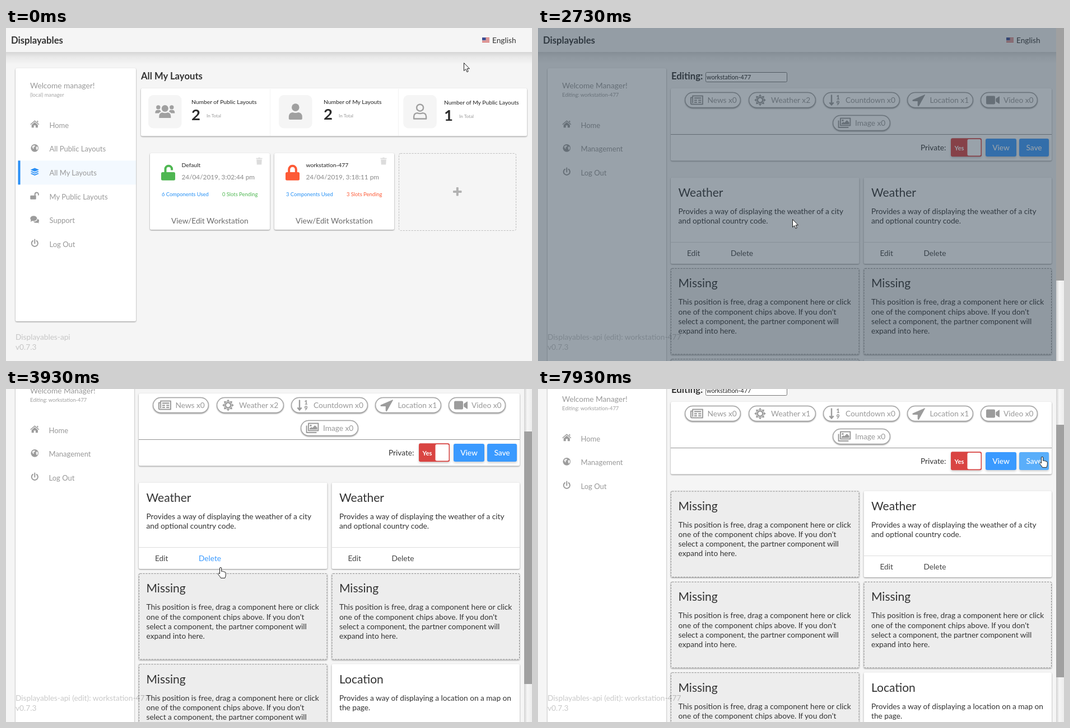
Recreate the animation shown at these times as an HTML page. Size 939 by 596 pixels, loop 8 s.

```html
<!DOCTYPE html>
<html lang="en">
<head>
<meta charset="utf-8">
<title>Displayables</title>
<style>
  html, body { margin: 0; width: 100%; height: 100%; overflow: hidden; background: #f5f5f5; }
  svg { display: block; width: 100vw; height: 100vh; font-family: Lato, sans-serif; }
  text { white-space: pre; }
  .panel { filter: drop-shadow(0 1px 1px rgba(0, 0, 0, .42)); }
  .button { filter: drop-shadow(0 2px 2px rgba(0, 0, 0, .2)); }
</style>
</head>
<body>
<svg id="stage" viewBox="0 0 939 596"></svg>
<script>
const BLUE = '#3a9aff', GREY = '#999', INK = '#333', ICON = '#9c9c9c';
const BODY = 13.7, NAV = 13, HEADING = 16.7;
const FPS = 15, LOOP = 8000, NOTCH = 85.5;

// Markup helpers; text is placed by the middle of its capitals.
const text = (x, y, s, size = BODY, fill = INK, extra = '') =>
  `<text x="${x}" y="${y + size * .355}" font-size="${size}" fill="${fill}" ${extra}>${s}</text>`;
const rect = (x, y, w, h, fill, extra = '') =>
  `<rect x="${x}" y="${y}" width="${w}" height="${h}" fill="${fill}" ${extra}/>`;
const panel = (x, y, w, h) => rect(x, y, w, h, '#fff', 'rx="2.5" class="panel"');
const line = (x1, y1, x2, y2, stroke) =>
  `<path d="M${x1} ${y1}L${x2} ${y2}" stroke="${stroke}"/>`;
const fillPath = (d, extra = '') => `<path d="${d}" ${extra}/>`;
const strokePath = (d, w, extra = '') =>
  `<path d="${d}" fill="none" stroke="currentColor" stroke-width="${w}" ${extra}/>`;
const disc = (x, y, r) => `<circle cx="${x}" cy="${y}" r="${r}"/>`;
const bold = 'font-weight="700"';

const icons = {
  home: fillPath('M-8 0L0-7 8 0 7 1.1 0-5-7 1.1ZM-5.6 1.2L0-3.6 5.6 1.2V6H1.6V2H-1.6V6H-5.6ZM4-6.2H6V-2.6L4-4.4Z'),
  globe: disc(0, 0, 6.9) + fillPath('M-5-2.5L-2-4.8 1-4.6 0-2.4-2-1.2-1.4 1-3 1.4ZM2.2-2.4L5.4-2.6 6 1 4 4 2.4 1.6Z', 'fill="#fff" opacity=".85"'),
  layers: fillPath('M0-7L7.6-3.7 0-.4-7.6-3.7ZM-7.6-.2L-5.4-1.2 0 1.2 5.4-1.2 7.6-.2 0 3.1ZM-7.6 3.2L-5.4 2.2 0 4.6 5.4 2.2 7.6 3.2 0 6.6Z'),
  unlock: rect(-8, -.5, 10.4, 7, 'currentColor', 'rx="1.2"') + strokePath('M.4 0V-2.6a3 3 0 0 1 6.2 0V-.6', 2),
  chat: `<ellipse cx="-2" cy="-2" rx="6" ry="4.6"/>` + fillPath('M-7.6 4L-6.4 0-3 2ZM4.8-1.4Q8 .2 7.8 2.6 7.6 4 6.6 4.8L8 6.8 4.6 5.8Q-.4 6.8-2.4 3.8 4.6 3.4 4.8-1.4Z'),
  power: strokePath('M-3.4-4.6a5.6 5.6 0 1 0 6.8 0M0-7V0', 2, 'stroke-linecap="round"'),
  trash: fillPath('M-5.5-5.2H-2L-1.3-6.2H1.3L2-5.2H5.5V-3.4H-5.5ZM-4.8-2.6H4.8L4.2 6.4H-4.2Z'),
  user: disc(0, -7.4, 6.8) + fillPath('M-12 13V9Q-11.6 2-5 1.4 0 3.6 5 1.4 11.6 2 12 9V13Q12 14.4 10 14.4H-10Q-12 14.4-12 13Z'),
  outline: strokePath('M-6-6.8a6 6 0 1 0 12 0a6 6 0 1 0-12 0ZM-11 13V9Q-10.6 3-5 2.6 0 4.6 5 2.6 10.6 3 11 9V13Z', 2.4, 'stroke-linejoin="round"'),
  group: disc(0, -5.6, 6) + disc(-12, -7.6, 3.7) + disc(12, -7.6, 3.7) +
    fillPath('M-10.5 11.5V8Q-10 2.4-4.6 1.8 0 3.6 4.6 1.8 10 2.4 10.5 8V11.5ZM-17.5 2Q-17.5-2.8-13-2.8H-9L-7 .2Q-9.6 1-11 3H-17.5ZM17.5 2Q17.5-2.8 13-2.8H9L7 .2Q9.6 1 11 3H17.5Z'),
  news: strokePath('M-7.4-7.4H10.4V7.4H-9Q-10.6 7.4-10.6 5.8V-4.6H-7.4ZM-7.4-5V5.6', 2, 'stroke-linejoin="round"') +
    strokePath('M-4.6-3.6H7.8M-4.6.4H.4M2.6.4H7.8M-4.6 4H.4M2.6 4H7.8', 2.2),
  sun: strokePath('M-4.8 0a4.8 4.8 0 1 0 9.6 0a4.8 4.8 0 1 0-9.6 0', 2.6) +
    [...Array(8)].map((_, i) => `<path d="M-3-6.4L0-10.4 3-6.4Z" transform="rotate(${i * 45})"/>`).join(''),
  count: strokePath('M-5-9.5V7M-8.6 4.4L-5 8.4-1.4 4.4', 2.4) +
    text(3.4, -5, '1', 10.5, 'currentColor', 'font-weight="900"') + text(3.4, 5.2, '9', 10.5, 'currentColor', 'font-weight="900"'),
  place: fillPath('M11.4-10L-10.6-.4Q-12 1.8-9.6 2H-1.8V9.6Q-1.4 12 .6 10.4L11.4-9Z'),
  video: rect(-12, -7.5, 16, 15, 'currentColor', 'rx="2"') + fillPath('M5.2-2.6L11-6.6Q12-6.8 12-5.6V5.6Q12 6.8 11 6.6L5.2 2.6Z'),
  image: strokePath('M-7-8.4H10.4V4.4H-7ZM-10.4-4.6V8H7.4', 2, 'stroke-linejoin="round"') +
    disc(-3, -4.6, 1.7) + fillPath('M-5 2.6V.6L-2-2 0-.4 4.4-5 8.6-1V2.6Z')
};
const icon = (name, x, y, color = ICON) =>
  `<g transform="translate(${x} ${y})" fill="${color}" color="${color}">${icons[name]}</g>`;

const header = (width, flagX) =>
  rect(0, 43, width, 22, 'url(#shade)') + rect(0, 0, width, 43, '#f5f5f5') +
  text(9, 22, 'Displayables', HEADING, INK, bold) +
  rect(flagX, 17, 13, 9, '#e9dede') +
  [0, 2, 4, 6, 8].map(i => rect(flagX, 17 + i, 13, 1, '#d0504f')).join('') +
  rect(flagX, 17, 6.5, 5, '#3c4c92') +
  text(flagX + 18, 22, 'English');

const nav = (items, x, active) => items.map(([name, label], i) => {
  const y = 174 + i * 42.65;
  const mark = i === active
    ? rect(21.5, y - 22, 210.5, 43, '#f3f9ff') + rect(21.5, y - 22, 4, 43, '#2a8ff5') : '';
  return mark + icon(name, 51.3, y - 1.8, i === active ? '#2a8ff5' : ICON) + text(x, y, label, NAV, GREY);
}).join('');

const stat = (boxX, x, y, name, label, n) =>
  rect(boxX, 120, 59.5, 59.5, '#f5f5f5', 'rx="9"') + icon(name, boxX + 29.8, 149.5, '#a0a0a0') +
  text(x, y, label, 10.3, '#222') + text(x, y + 22.5, n, 27.5, '#2b2b2b', bold) +
  text(x + 27, y + 24.8, 'In Total', 8.2, GREY);

function layoutCard(x, title, date, used, pending, color, open) {
  const cx = x + 32.5;
  const shackle = open ? `M${cx - 5} 260V252.5a5.8 5.8 0 0 1 11.6 0V254.5` : `M${cx - 6.3} 260V253a6.3 6.3 0 0 1 12.6 0V260`;
  return panel(x, 224, 214, 137) + icon('trash', x + 195, 238, '#dcdcdc') +
    rect(x + 20, 258, 25, 14.8, color, 'rx="2.5"') + `<g color="${color}">${strokePath(shackle, 4)}</g>` +
    text(x + 56.5, 245.5, title, 10.3, '#222') + text(x + 56.5, 267.3, date, 11.8, '#8a8a8a') +
    text(x + 21, 298, used + ' Components Used', 9.4, '#2590f5') +
    text(x + 129, 298, pending + ' Slots Pending', 9.4, color);
}

const viewLabel = (x, id) => text(x, 345, 'View/Edit Workstation', BODY, '#6b6b6b', `text-anchor="middle" id="${id}"`);

const listPage = header(939, 850) +
  panel(17, 72, 215, 453) +
  text(43, 103, 'Welcome manager!', BODY, GREY) + text(43, 120, '(local) manager', 9.2, '#a5a5a5') +
  nav([['home', 'Home'], ['globe', 'All Public Layouts'], ['layers', 'All My Layouts'],
    ['unlock', 'My Public Layouts'], ['chat', 'Support'], ['power', 'Log Out']], 77.5, 2) +
  text(241, 86.5, 'All My Layouts', HEADING, INK, bold) +
  panel(241, 108, 689, 85.5) + line(471.5, 109, 471.5, 193, '#f3f3f3') + line(700.5, 109, 700.5, 193, '#f3f3f3') +
  stat(254, 331, 132.7, 'group', 'Number of Public Layouts', 2) +
  stat(487, 567, 132, 'user', 'Number of My Layouts', 2) +
  stat(709.3, 782, 133.4, 'outline', 'Number of My Public Layouts', 1) +
  layoutCard(257, 'Default', '24/04/2019, 3:02:44 pm', 6, 0, '#4fb752', true) +
  layoutCard(479, 'workstation-477', '24/04/2019, 3:18:11 pm', 3, 3, '#fd5a36', false) +
  rect(479, 329, 214, 32, BLUE, 'id="viewTint" opacity="0"') +
  viewLabel(363.8, 'view0') + viewLabel(585.8, 'view1') +
  rect(701.5, 224.5, 209, 138, 'none', 'rx="3" stroke="#bdbdbd" stroke-dasharray="3 2"') +
  rect(798, 291, 15.5, 4, '#b2b2b2', 'rx="1"') + rect(803.8, 285, 4, 15.5, '#b2b2b2', 'rx="1"') +
  text(17, 553.5, 'Displayables-api', BODY, '#c6c6c6') + text(17, 571, 'v0.7.3', BODY, '#c6c6c6');

const chip = (x, y, w, name, iconX, label, textX, id = '') =>
  rect(x + .7, y - 13.5, w - 1.4, 27, '#fff', `rx="13.5" stroke="#a2a2a2" stroke-width="1.3" class="panel"`) +
  icon(name, iconX, y) + text(textX, y, label, BODY, GREY, id && `id="${id}"`);

const button = (x, w, label, id) =>
  rect(x, 198, w, 32, BLUE, `rx="3" class="button" id="${id}"`) +
  text(x + w / 2, 214.5, label, BODY, '#fff', 'font-weight="500" text-anchor="middle"');

const about = {
  Weather: ['Provides a way of displaying the weather of a city', 'and optional country code.'],
  Location: ['Provides a way of displaying a location on a map on', 'the page.'],
  Missing: ['This position is free, drag a component here or click', "one of the component chips above. If you don't",
    'select a component, the partner component will', 'expand into here.']
};

function slot(col, row, kind, id = '') {
  const x = col ? 581.5 : 237, y = 267.6 + row * 162.3, w = col ? 335.5 : 336.5, free = kind === 'Missing';
  const box = free
    ? rect(x, y, w, 154.5, '#ededed', 'rx="2" class="panel"') +
      rect(x + .5, y + .5, w - 1, 153.5, 'none', 'rx="2" stroke="#8f8f8f" stroke-dasharray="3 2"')
    : panel(x, y, w, 154.5) + line(x, y + 116, x + w, y + 116, '#dcdcdc') +
      text(x + 29, y + 135.6, 'Edit', BODY, '#444') +
      text(x + 107, y + 135.6, 'Delete', BODY, '#444', id && `id="delete"`);
  return `<g id="${id}">` + box + text(x + 13.5, y + 27, kind, 21) +
    about[kind].map((s, i) => text(x + 13.5, y + 60.7 + i * 17.1, s)).join('') + '</g>';
}

const editPage = header(925, 836) +
  panel(17, 72, 212, 667) +
  text(43, 103, 'Welcome Manager!', BODY, GREY) + text(43, 120, 'Editing: workstation-477', 9.3, '#a0a0a0') +
  nav([['home', 'Home'], ['globe', 'Management'], ['power', 'Log Out']], 76.5, -1) +
  text(238, 86.5, 'Editing:', HEADING, INK, bold) +
  rect(299.5, 79.5, 145, 17, '#fff', 'rx="2" stroke="#777"') + text(301, 88.3, 'workstation-477', 10.8, '#222') +
  panel(237, 108, 680, 129.5) + line(237, 190.5, 917, 190.5, '#929292') +
  chip(262, 129, 100, 'news', 283.5, 'News x0', 302.5) +
  chip(376, 129, 120, 'sun', 396.5, 'Weather x2', 416, 'weather') +
  chip(509, 129, 137, 'count', 529, 'Countdown x0', 549) +
  chip(659, 129, 118, 'place', 679.5, 'Location x1', 699.5) +
  chip(790, 129, 102, 'video', 812, 'Video x0', 831) +
  chip(526, 170, 103, 'image', 547, 'Image x0', 566) +
  text(683, 214.5, 'Private:') +
  rect(737, 197.3, 55, 33, '#d94442', 'rx="3" class="button"') + rect(766.5, 199, 24, 29.6, '#fff', 'rx="2.5"') +
  text(743.5, 214.5, 'Yes', 11.3, '#fff', bold) +
  button(799, 55, 'View', 'view') + button(859, 53, 'Save', 'save') +
  slot(0, 0, 'Weather', 'filled') + slot(0, 0, 'Missing', 'emptied') + slot(1, 0, 'Weather') +
  slot(0, 1, 'Missing') + slot(1, 1, 'Missing') + slot(0, 2, 'Missing') + slot(1, 2, 'Location');

const cube = id => rect(-6.5, -6.5, 13, 13, '#f5f5f5', `id="${id}"`);

document.getElementById('stage').innerHTML = `
  <defs>
    <linearGradient id="shade" x2="0" y2="1">
      <stop stop-color="#000" stop-opacity=".13"/><stop offset=".4" stop-color="#000" stop-opacity=".05"/>
      <stop offset="1" stop-color="#000" stop-opacity="0"/>
    </linearGradient>
    <linearGradient id="track">
      <stop stop-color="#d2d2d2"/><stop offset=".4" stop-color="#f6f6f6"/><stop offset="1" stop-color="#ececec"/>
    </linearGradient>
  </defs>
  ${rect(0, 0, 939, 596, '#f5f5f5')}
  <g id="list">${listPage}</g>
  <g id="edit">
    <g id="scroller">${editPage}</g>
    ${text(17, 553.5, 'Displayables-api (edit): workstation-477', BODY, '#000', 'opacity=".21"')}
    ${text(17, 571, 'v0.7.3', BODY, '#000', 'opacity=".21"')}
    <g id="loader">${rect(0, 0, 925, 596, '#2c3e50')}<g id="cubes">${cube('cubeA')}${cube('cubeB')}</g></g>
    ${rect(925, 0, 14, 596, 'url(#track)')}${rect(925, 0, 14, 452, '#a0a0a0', 'id="thumb"')}
  </g>
  <g id="cursor" fill="#fff" stroke="#1c1c1c" stroke-linejoin="round">
    <path id="arrow" d="M.5 .5V14.6L3.7 11.6 6 16.8 8.2 15.8 6 10.8H10.4Z"/>
    <path id="hand" d="M-1.5 12V2a1.6 1.6 0 0 1 3.2 0V7.4Q3.4 6.4 4.4 7.8 6 7.2 7 8.6 9.2 8.4 9.3 10.4V13.5Q9.3 16 7.8 19.4H.5Q-1 16.5-4 13.2-5.2 10.9-3.4 10.4-2.3 10.6-1.5 12Z"/>
  </g>`;

const ui = {};
document.querySelectorAll('svg [id]').forEach(el => { if (el.id) ui[el.id] = el; });

const clamp = v => Math.min(1, Math.max(0, v));
const smooth = v => { v = clamp(v); return v * v * (3 - 2 * v); };
const show = (el, on) => el.setAttribute('display', on ? 'inline' : 'none');
const inside = (x, y, x0, y0, x1, y1) => x >= x0 && x <= x1 && y >= y0 && y <= y1;

// Pointer stops: time, x, y
const stops = [[0, 817, 62], [467, 817, 62], [1333, 556, 345], [2333, 556, 345], [2933, 419, 341], [3200, 383, 320],
  [3867, 383, 320], [4733, 360, 237], [4867, 360, 232], [5467, 360, 232], [5533, 360, 233], [6467, 360, 233],
  [6533, 362, 233], [7133, 362, 233], [7933, 900, 121], [8000, 900, 121]];

function pointer(t) {
  const i = Math.max(1, stops.findIndex(s => s[0] >= t));
  const [t0, x0, y0] = stops[i - 1], [t1, x1, y1] = stops[i];
  const e = smooth((t - t0) / (t1 - t0));
  return [x0 + (x1 - x0) * e, y0 + (y1 - y0) * e];
}

function placeCube(el, phase) {
  const p = (phase % 1) * 4, side = Math.floor(p), e = smooth(p - side);
  const x = [e, 1, 1 - e, 0][side], y = [0, e, 1, 1 - e][side];
  const scale = side % 2 ? .5 + e / 2 : 1 - e / 2;
  el.setAttribute('transform', `translate(${452 + 36 * x} ${287 + 36 * y}) rotate(${-90 * (side + e)}) scale(${scale})`);
}

function draw(ms) {
  const t = Math.floor((ms + 5) * FPS / 1000) * 1000 / FPS + .5;
  const editing = t > 2066, loading = editing && t < 2400, removed = t > 5733;
  const tick = start => smooth((t - start) / 260);
  const scroll = Math.floor(NOTCH * (tick(3331) + tick(3865) - tick(6731)));
  const [x, y] = pointer(t);

  const onView = !editing && inside(x, y, 479, 329, 693, 361);
  const onDelete = t > 3200 && t < 5800 && inside(x, y + scroll, 328, 385, 402, 421);
  const onSave = editing && inside(x, y + scroll, 859, 198, 912, 230);

  show(ui.list, !editing);
  show(ui.edit, editing);
  ui.viewTint.setAttribute('opacity', onView ? .08 * clamp((t - 1333) / 533) : 0);
  ui.view1.setAttribute('fill', onView ? BLUE : '#6b6b6b');

  ui.scroller.setAttribute('transform', `translate(0 ${-scroll})`);
  ui.thumb.setAttribute('y', Math.round(scroll * .755));
  ui.thumb.setAttribute('height', t < 2133 ? 311.5 : 452);
  show(ui.filled, !removed);
  show(ui.emptied, removed);
  ui.weather.textContent = removed ? 'Weather x1' : 'Weather x2';
  ui.delete.setAttribute('fill', onDelete ? BLUE : '#444');
  ui.save.setAttribute('fill', onSave ? '#5aaefa' : BLUE);

  ui.loader.setAttribute('opacity', clamp(1 - (t - 2333) / 773));
  show(ui.cubes, loading);
  const spin = Math.max(0, Math.min(t, 2200) - 2016) / 1800;
  placeCube(ui.cubeA, spin);
  placeCube(ui.cubeB, spin + .5);

  const hand = onView || loading || onDelete || onSave;
  show(ui.hand, hand);
  show(ui.arrow, !hand);
  ui.cursor.setAttribute('transform', `translate(${Math.round(x)} ${Math.round(y)})`);
}

const begin = performance.now();
function loop(now) {
  draw(Math.max(0, now - begin) % LOOP);
  requestAnimationFrame(loop);
}
draw(0);
requestAnimationFrame(loop);
</script>
</body>
</html>
```
